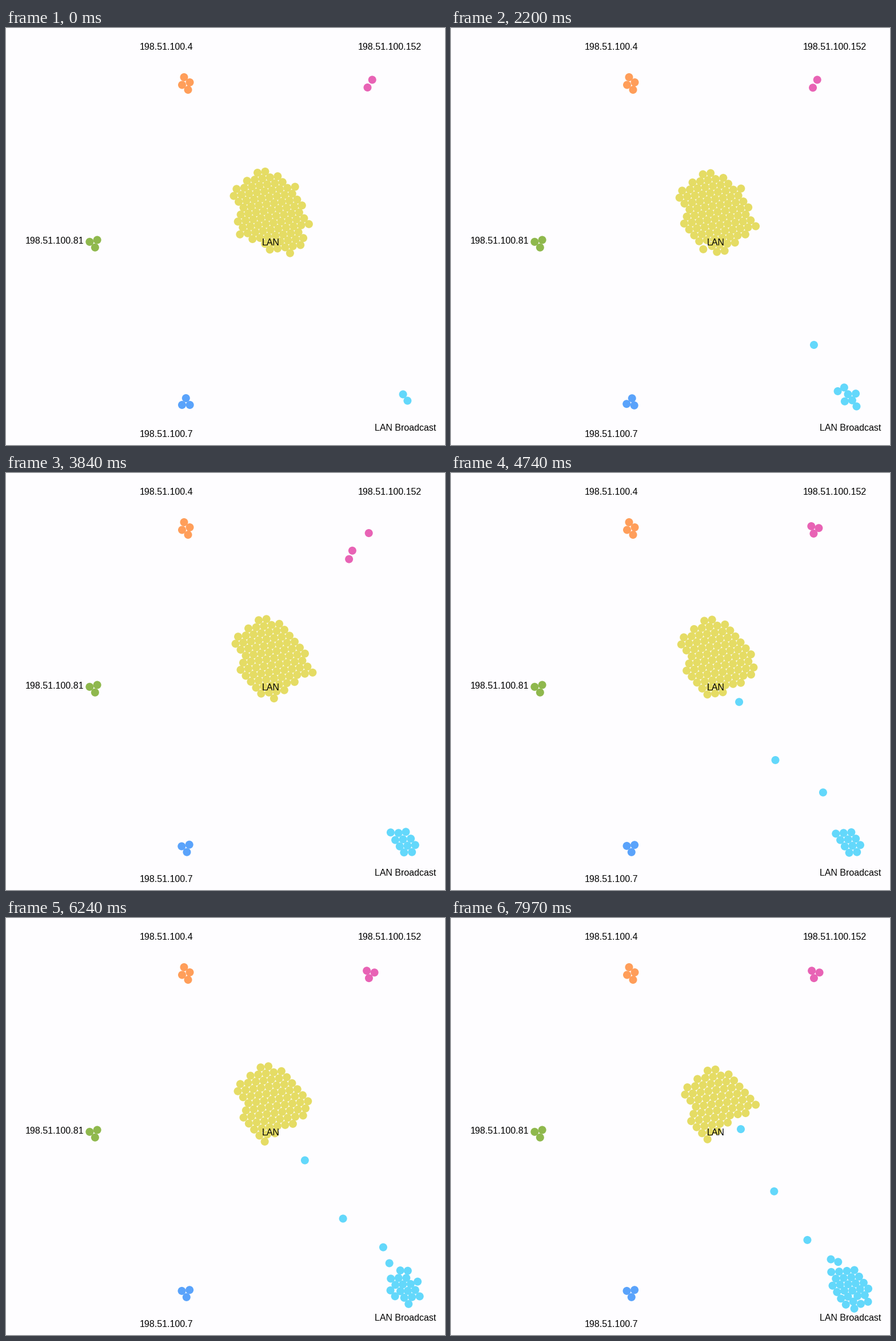
A matplotlib script for the animation above (8000 ms loop, 768 by 729 pixels).

```python
import numpy as np
import matplotlib.pyplot as plt
from matplotlib.animation import FuncAnimation

W, H, DPI = 768, 729, 96
LOOP, FRAMES = 8000, 250
RADIUS = 7
GAP = 13.6              # spacing of packed dots
RATE = 0.0056           # spring rate per ms
FIRST, TICK = 145, 180.5  # clock of the departures, ms

COLORS = {
    "lan": "#e5dc64", "cast": "#63d8fb", "blue": "#5aa3fb",
    "pink": "#e863b5", "orange": "#ff9e5a", "green": "#8fb84d",
}
CENTER = np.array([464, 322])
HUBS = {
    "cast": np.array([698.5, 646]),
    "blue": np.array([314.8, 655]),
    "pink": np.array([637, 97.5]),
}
LABELS = [
    (280.5, 37.5, "198.51.100.4"), (671.5, 37.5, "198.51.100.152"),
    (85, 376.5, "198.51.100.81"), (280.5, 715, "198.51.100.7"),
    (463.5, 379.5, "LAN"), (699, 704, "LAN Broadcast"),
]

# One letter per tick: a dot leaves for (c)ast, (b)lue or (p)ink;
# a capital brings one back to the lattice.
SCRIPT = "cccbcBc..c..ccc...pPp.." + "c" * 21
NAMES = {"c": "cast", "b": "blue", "p": "pink"}
RETURNS = {"B": (11, 4), "P": (2, 5)}
LEAN = np.array([0.6, 0.8])   # direction in which the lattice frays

# First and last column of every lattice row
LEFT = [0, -1, -2, -2, -1, 0, 0, 0, 1, 1, 3, 5, 6, 9]
RIGHT = [1, 3, 4, 6, 6, 7, 8, 8, 9, 10, 9, 10, 10, 9]


def lattice(row, col):
    """Place of a lattice cell; the whole lattice drifts and shears."""
    def goal(t):
        u = t / LOOP
        corner = np.array([440 + 9 * u**2, 253 + 14 * u - 20 * u**2 * (1 - u)])
        across = np.array([13.4 + 0.2 * u, -2])
        down = np.array([-4.9 + 0.8 * u, 12.2 + 0.4 * u])
        return corner + col * across + row * down
    return goal


def still(x, y):
    return lambda t: np.array([x, y])


def polar(hub, deg, turn=0):
    """Place around a hub, turning slowly in mid loop."""
    def goal(t):
        u = np.clip((t - 1000) / 3500, 0, 1)
        a = np.radians(deg + turn * u * u * (3 - 2 * u))
        return np.array(hub) + 7.9 * np.array([np.cos(a), np.sin(a)])
    return goal


def packing(hub, tilt=-5, reach=5):
    """Hexagonal places around a hub, inner ones first."""
    a, b = (GAP * np.array([np.cos(r), np.sin(r)])
            for r in np.radians([tilt, tilt + 60]))
    cells = [i * a + (j + 0.5) * b for i in range(-reach, reach + 1)
             for j in range(-reach, reach + 1)]
    side = np.array([-LEAN[1], LEAN[0]])
    cells.sort(key=lambda p: np.hypot(0.75 * (p @ LEAN), p @ side))
    return [still(*(hub + p)) for p in cells]


def spring(age):
    s = RATE * age
    return (1 + s) * np.exp(-s)


class Dot:
    def __init__(self, group, goal):
        self.legs = [(0, group, goal)]

    def go(self, t, group, goal):
        self.legs.append((t, group, goal))

    def leg(self, t):
        return max(k for k, (t0, _, _) in enumerate(self.legs) if t >= t0)

    def group(self, t):
        return self.legs[self.leg(t)][1]

    def is_free(self, t):
        return self.leg(t) > 0 or self.legs[0][1] != "lan"

    def spot(self, t, k=None):
        k = self.leg(t) if k is None else k
        t0, group, goal = self.legs[k]
        home = goal(t)
        if k == 0:
            return home
        rest = spring(t - t0)
        # head for the hub first, then settle into the own place
        home = home + min(1, 5 * rest) * (HUBS.get(group, home) - home)
        return home + rest * (self.spot(t0, k - 1) - home)


def build():
    lan = [Dot("lan", lattice(j, i))
           for j, (lo, hi) in enumerate(zip(LEFT, RIGHT))
           for i in range(lo, hi + 1)]
    blue, pink = HUBS["blue"], HUBS["pink"]
    places = {
        "cast": packing(HUBS["cast"]),
        "blue": [polar(blue, 30, 53)],
        "pink": [polar(pink, 222), polar(pink, -16)],
    }
    members = {
        "cast": [Dot("cast", places["cast"].pop(0)) for _ in range(2)],
        "blue": [Dot("blue", polar(blue, d, 53)) for d in (30, 150, 270)],
        "pink": [Dot("pink", polar(pink, -62)),
                 Dot("pink", polar(pink, 125, -20))],
        "green": [Dot("green", polar((153.9, 376), d))
                  for d in (76, 196, 316)],
        "orange": [Dot("orange", still(x, y)) for x, y in
                   [(311.5, 86), (321.5, 95), (308, 99.5), (318.5, 108)]],
    }
    dots = lan + sum(members.values(), [])

    for n, event in enumerate(SCRIPT):
        if event == ".":
            continue
        t = FIRST + n * TICK
        name = NAMES[event.lower()]
        if event in RETURNS:
            dot = members[name].pop(0)
            dot.go(t, "lan", lattice(*RETURNS[event]))
            lan.append(dot)
        else:
            way = np.sign(HUBS[name] - CENTER) * LEAN
            dot = max(lan, key=lambda d: d.legs[-1][2](0) @ way)
            lan.remove(dot)
            dot.go(t, name, places[name].pop(0))
    return dots


def separate(pts):
    """Push overlapping dots apart."""
    for _ in range(6):
        diff = pts[:, None] - pts[None]
        dist = np.hypot(diff[..., 0], diff[..., 1])
        np.fill_diagonal(dist, 1e6)
        push = np.clip(GAP - 0.6 - dist, 0, None) / np.maximum(dist, 0.5) / 2
        pts = pts + (diff * push[..., None]).sum(axis=1)
    return pts


dots = build()

fig = plt.figure(figsize=(W / DPI, H / DPI), dpi=DPI, facecolor="#fefdff")
ax = fig.add_axes([0, 0, 1, 1])
ax.set_xlim(0, W)
ax.set_ylim(H, 0)
ax.axis("off")
marks = ax.scatter(np.zeros(len(dots)), np.zeros(len(dots)),
                   s=(2 * RADIUS * 72 / DPI) ** 2, linewidths=0,
                   c=["#ffffff"] * len(dots))
for x, y, text in LABELS:
    ax.text(x, y, text, family="Liberation Sans", size=16 * 72 / DPI,
            color="black", ha="center", va="baseline", zorder=5)


def draw(frame):
    t = frame * LOOP / FRAMES
    order = sorted(dots, key=lambda d: d.is_free(t))
    pts = np.array([d.spot(t) for d in order], dtype=float)
    n = sum(not d.is_free(t) for d in order)
    pts[n:] = separate(pts[n:])
    marks.set_offsets(pts)
    marks.set_facecolor([COLORS[d.group(t)] for d in order])
    return [marks]


anim = FuncAnimation(fig, draw, frames=FRAMES, interval=LOOP // FRAMES,
                     repeat=True, repeat_delay=0)
plt.show()
```
